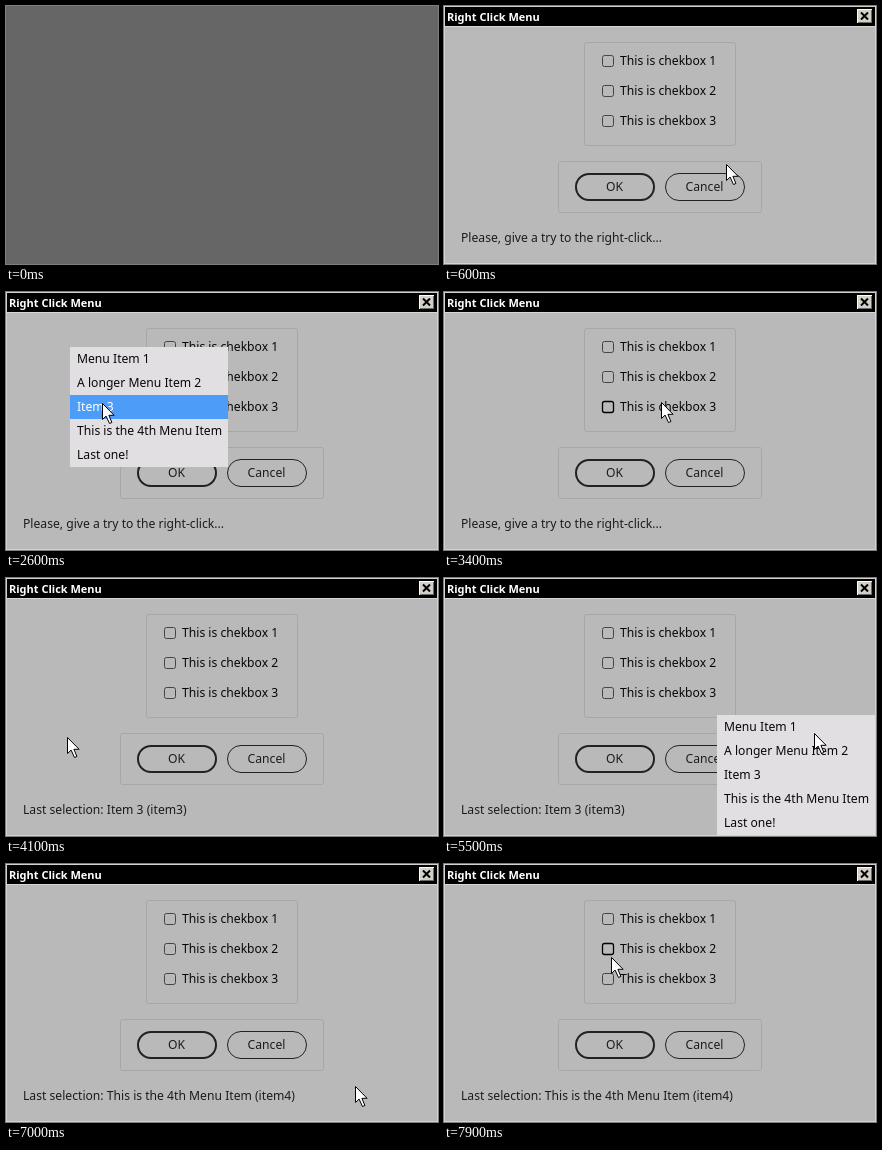
An HTML page with a canvas for the animation above (8000 ms loop, 432 by 258 pixels).

```html
<!DOCTYPE html>
<html lang="en">
<head>
<meta charset="utf-8">
<title>Right Click Menu</title>
<style>
  html, body { margin: 0; width: 100%; height: 100%; overflow: hidden; background: #666; }
  canvas { display: block; }
</style>
</head>
<body>
<canvas id="stage" width="432" height="258"></canvas>
<script>
const ctx = document.getElementById('stage').getContext('2d');
const LOOP = 8000, STEP = 100;
const FONT = '12.15px "Noto Sans", "Open Sans", sans-serif';
const TITLE_FONT = 'bold 11px "Noto Sans", "Open Sans", sans-serif';
const BACK = '#b9b9b9', INK = '#1c1c1c', DARK = '#080808';

const ITEMS = ['Menu Item 1', 'A longer Menu Item 2', 'Item 3', 'This is the 4th Menu Item', 'Last one!'];
const MENU_W = 158, ROW = 24;
const MENUS = [
  { x: 64, y: 55, open: 1700, close: 3400 },
  { x: 273, y: 137, open: 5500, close: 6600 }
];
const STATUS = [
  { from: 0, label: 'Please, give a try to the right-click...' },
  { from: 3500, label: 'Last selection: Item 3 (item3)' },
  { from: 6700, label: 'Last selection: This is the 4th Menu Item (item4)' }
];

// Each pointer move is an arc that passes through "via" halfway.
const ENTRY = [401, 232];
const MOVES = [
  { start: 400, end: 1300, via: [35, 10], to: [64, 55] },
  { start: 1700, end: 2600, via: [277, 150], to: [96, 111] },
  { start: 2600, end: 3200, via: [255, 125], to: [217, 110] },
  { start: 3700, end: 4100, via: [260, 190], to: [61, 159] },
  { start: 4100, end: 4300, via: [23, 125], to: [63, 120] },
  { start: 4400, end: 5100, via: [200, 80], to: [370, 155] },
  { start: 5500, end: 6200, via: [159, 52], to: [349, 222] },
  { start: 7000, end: 7900, via: [150, 60], to: [167, 93] }
];

const ease = u => u * u * (3 - 2 * u);

function pointer(t) {
  const i = MOVES.findLastIndex(m => t >= m.start);
  if (i < 0) return null;
  const { start, end, via, to } = MOVES[i];
  const from = i ? MOVES[i - 1].to : ENTRY;
  const e = ease(Math.min(1, (t - start) / (end - start)));
  const bend = Math.sin(Math.PI * e);
  return from.map((a, k) => {
    const b = to[k];
    return Math.round(a + (b - a) * e + (via[k] - (a + b) / 2) * bend);
  });
}

const inside = ([px, py], x, y, w, h) => px >= x && px < x + w && py >= y && py < y + h;

// The last row entered stays lit when the pointer leaves the menu.
function litRow(menu, t) {
  for (let s = t; s > menu.open; s -= STEP) {
    const pos = pointer(s);
    if (inside(pos, menu.x, menu.y, MENU_W, ROW * ITEMS.length)) {
      return Math.floor((pos[1] - menu.y) / ROW);
    }
  }
  return -1;
}

function rect(x, y, w, h, color) {
  ctx.fillStyle = color;
  ctx.fillRect(x, y, w, h);
}

function stroke(color, width) {
  ctx.strokeStyle = color;
  ctx.lineWidth = width;
  ctx.stroke();
}

function outline(x, y, w, h, radius, color, width) {
  ctx.beginPath();
  ctx.roundRect(x, y, w, h, radius);
  stroke(color, width);
}

function text(str, x, y, color = INK, align = 'left', font = FONT) {
  ctx.font = font;
  ctx.textAlign = align;
  ctx.fillStyle = color;
  ctx.fillText(str, x, y);
}

function drawTitleBar() {
  rect(1, 1, 430, 19, '#000');
  rect(1, 20, 430, 1, '#d6d6d6');
  text('Right Click Menu', 3, 15, '#fff', 'left', TITLE_FONT);
  rect(413, 3, 15, 14, '#fff');
  rect(414, 4, 14, 13, '#6a6a6a');
  rect(414, 4, 13, 12, '#d4d0c8');
  ctx.beginPath();
  ctx.moveTo(417, 6.5);
  ctx.lineTo(424, 13.5);
  ctx.moveTo(424, 6.5);
  ctx.lineTo(417, 13.5);
  stroke('#000', 2);
}

function drawDialog(pos, menuOpen, t) {
  rect(0, 0, 432, 258, '#d2d2d2');
  rect(1, 1, 430, 256, BACK);
  drawTitleBar();
  outline(140.5, 36.5, 151, 103, 2, '#a7a7a7', 1);
  outline(114.5, 155.5, 203, 51, 2, '#a7a7a7', 1);
  for (let i = 0; i < 3; i++) {
    const y = 49 + 30 * i;
    const hot = pos && !menuOpen && inside(pos, 156, y - 2, 118, 18);
    outline(158.5, y + 0.5, 11, 11, 2, hot ? '#000' : '#444', hot ? 1.3 : 1);
    text('This is chekbox ' + (i + 1), 176, y + 10, DARK);
  }
  outline(132, 168, 78, 26, 13, '#222', 2);
  outline(221.5, 167.5, 79, 27, 13.5, '#222', 1);
  text('OK', 170.5, 185, INK, 'center');
  text('Cancel', 260.5, 185, INK, 'center');
  text(STATUS.findLast(s => t >= s.from).label, 17, 236);
}

function drawMenu(menu, t) {
  rect(menu.x, menu.y, MENU_W, ROW * ITEMS.length, '#e2dfe3');
  const lit = litRow(menu, t);
  ITEMS.forEach((label, i) => {
    const y = menu.y + i * ROW;
    if (i === lit) rect(menu.x, y, MENU_W, ROW, '#4d9cf8');
    text(label, menu.x + 7, y + 16, i === lit ? '#fff' : DARK);
  });
}

const ARROW = new Path2D('M0 0V16L3.6 12.6 7 20 9.4 19 6.4 11.8H11.6Z');

function drawPointer([x, y]) {
  ctx.save();
  ctx.translate(x + 0.5, y + 0.5);
  ctx.fillStyle = '#fff';
  ctx.fill(ARROW);
  ctx.strokeStyle = '#000';
  ctx.lineWidth = 1;
  ctx.stroke(ARROW);
  ctx.restore();
}

function draw(t) {
  if (t >= 100) {
    const menu = MENUS.find(m => t >= m.open && t < m.close);
    const pos = pointer(t);
    drawDialog(pos, !!menu, t);
    if (menu) drawMenu(menu, t);
    if (pos) drawPointer(pos);
  }
  if (t < 200) {
    ctx.globalAlpha = t < 100 ? 1 : 0.5;
    rect(0, 0, 432, 258, '#666');
    ctx.globalAlpha = 1;
  }
}

const began = performance.now();
function tick() {
  const t = (performance.now() - began) % LOOP;
  draw(Math.floor(t / STEP) * STEP);
  requestAnimationFrame(tick);
}
tick();
</script>
</body>
</html>
```
